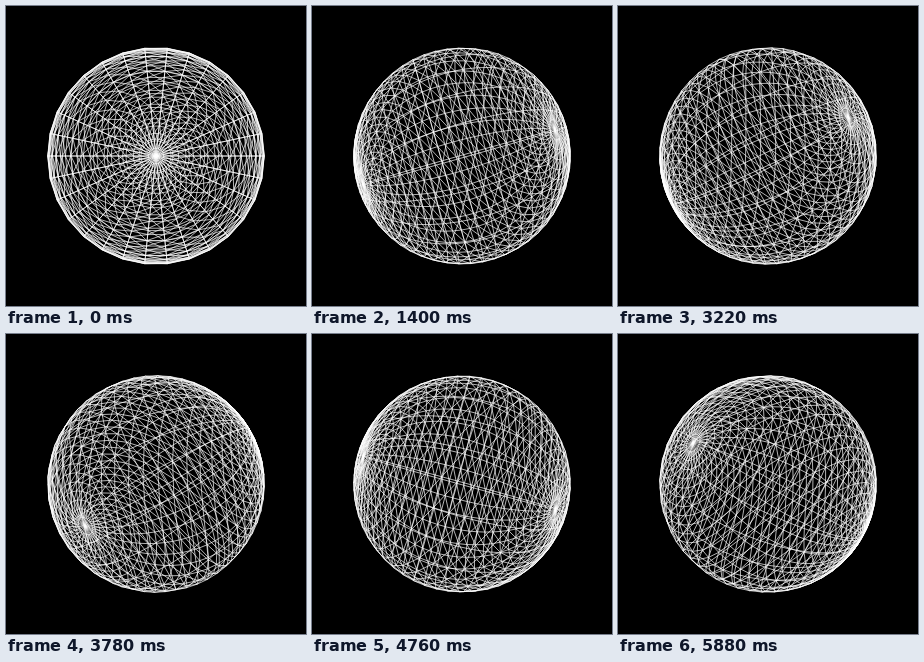
Recreate the animation shown at these times as an HTML page with a canvas. Size 300 by 300 pixels, loop 6.02 s.

```html
<!DOCTYPE html>
<html>
<head>
<meta charset="utf-8">
<title>Tumbling wire sphere</title>
<style>
  html, body { margin: 0; width: 100%; height: 100%; overflow: hidden; background: #000; }
  canvas { display: block; width: 300px; height: 300px; }
</style>
</head>
<body>
<canvas id="stage" width="300" height="300"></canvas>
<script>
const ctx = document.getElementById('stage').getContext('2d');
const SIZE = 300, MID = SIZE / 2;
const RADIUS = 100;
const EYE = MID / Math.tan(Math.PI / 6); // 60 degree field of view
const DETAIL = 30;
const STEP_MS = 140, STEPS = 43, TURN = 0.5;

// Point on the sphere; the poles lie on the z axis, about which it also spins.
function point(ring, spoke, spin) {
  const lat = Math.PI * ring / DETAIL;
  const lon = 2 * Math.PI * spoke / DETAIL + spin;
  const r = RADIUS * Math.sin(lat);
  return [r * Math.cos(lon), r * Math.sin(lon), RADIUS * Math.cos(lat)];
}

// Turn about y, then x, then project in perspective.
function project([x, y, z], angle) {
  const c = Math.cos(angle), s = Math.sin(angle);
  const x1 = x * c + z * s, z1 = z * c - x * s;
  const y2 = y * c - z1 * s, z2 = y * s + z1 * c;
  const k = EYE / (EYE - z2);
  return [MID + x1 * k, MID + y2 * k];
}

function draw(angle) {
  const at = (ring, spoke) => project(point(ring, spoke, angle), angle);
  const line = (a, b) => { ctx.moveTo(...a); ctx.lineTo(...b); };

  ctx.fillStyle = '#000';
  ctx.fillRect(0, 0, SIZE, SIZE);
  ctx.strokeStyle = '#fff';
  ctx.lineWidth = 0.7;
  ctx.beginPath();
  for (let ring = 0; ring < DETAIL; ring++) {
    for (let spoke = 0; spoke < DETAIL; spoke++) {
      const a = at(ring, spoke), b = at(ring + 1, spoke);
      line(a, b);
      if (ring === 0) continue;
      const next = at(ring, spoke + 1);
      line(a, next);
      if (ring < DETAIL - 1) line(b, next);
    }
  }
  ctx.stroke();
}

let shown = -1;
const start = performance.now();
function tick(now) {
  const step = Math.floor(Math.max(0, now - start) / STEP_MS) % STEPS;
  if (step !== shown) draw((shown = step) * TURN);
  requestAnimationFrame(tick);
}
tick(start);
</script>
</body>
</html>
```
